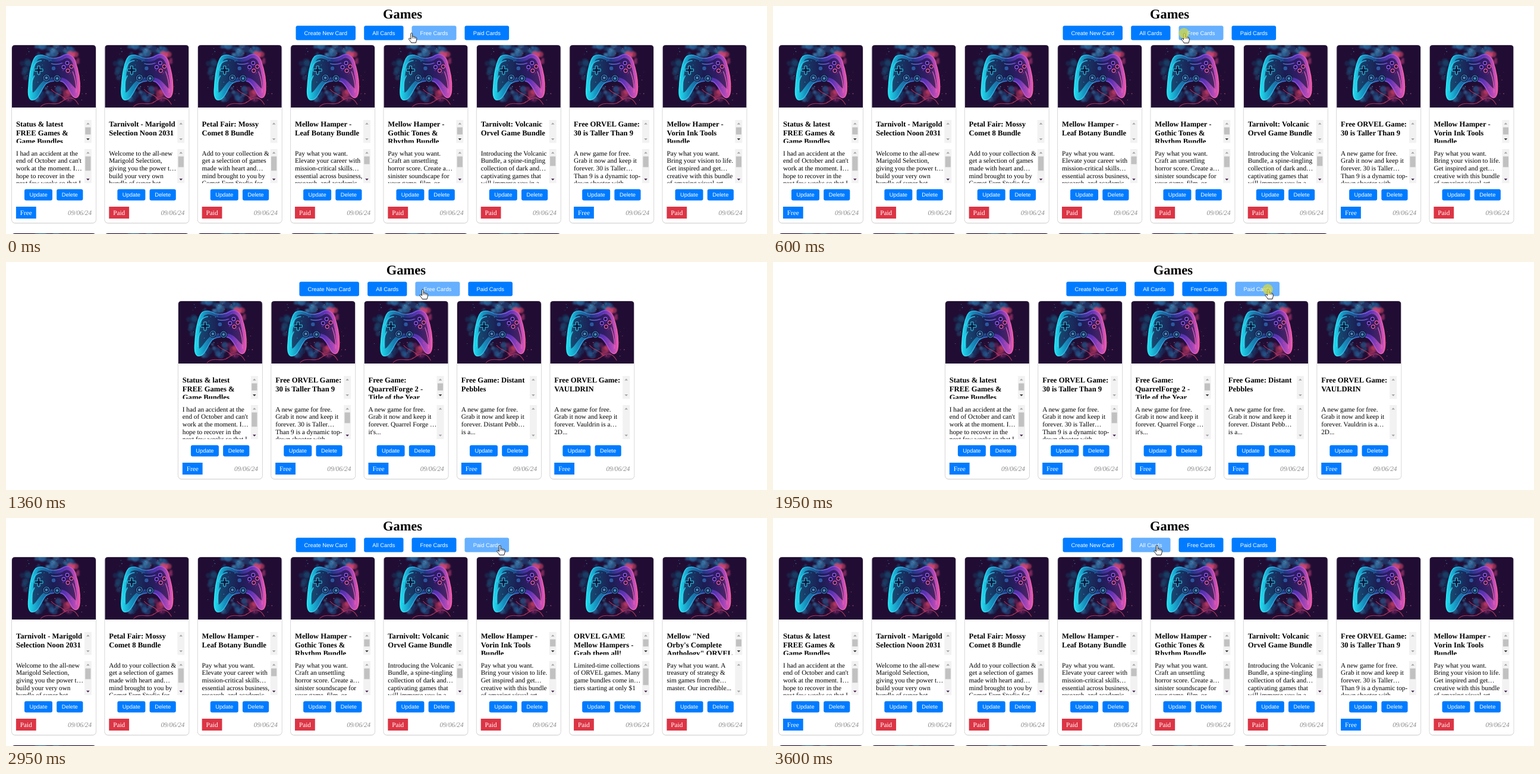
Recreate the animation shown at these times as an HTML page. Size 1280 by 384 pixels, loop 4.68 s.

```html
<!DOCTYPE html>
<html lang="en">
<head>
<meta charset="utf-8">
<title>Games</title>
<style>
html, body { margin: 0; width: 100%; height: 100%; overflow: hidden; background: #fff; }
svg { display: block; width: 100vw; height: 100vh; }
text { font-family: "Liberation Serif", "Times New Roman", serif; font-size: 11.25px; text-rendering: geometricPrecision; }
.h1 { font-size: 22.5px; font-weight: bold; text-anchor: middle; }
.title { font-size: 12.65px; font-weight: bold; }
.btn { font-family: "Liberation Sans", Arial, sans-serif; font-size: 9.37px; fill: #fff; text-anchor: middle; }
.date { font-style: italic; fill: #8a8a8a; text-anchor: end; }
.white { fill: #fff; }
</style>
</head>
<body>
<svg id="stage" viewBox="0 0 1280 384" xmlns="http://www.w3.org/2000/svg"></svg>
<script>
const LOOP = 4680, PITCH = 156.36, ROW = 317;
const BLUE = '#007bff', HOVER = '#66b0ff', RED = '#dc3545';

// [free, title, body, body thumb height]
const CARDS = [
  [1, "Status & latest|FREE Games &|Game Bundles", "I had an accident at the|end of October and can't|work at the moment. I…|hope to recover in the|next few weeks so that I", 24],
  [0, "Tarnivolt - Marigold|Selection Noon 2031", "Welcome to the all-new|Marigold Selection,|giving you the power t…|build your very own|bundle of super hot", 18],
  [0, "Petal Fair: Mossy|Comet 8 Bundle", "Add to your collection &|get a selection of games|made with heart and…|mind brought to you by|Comet Fern Studio for", 24],
  [0, "Mellow Hamper -|Leaf Botany Bundle", "Pay what you want.|Elevate your career with|mission-critical skills…|essential across business,|research, and academic", 13],
  [0, "Mellow Hamper -|Gothic Tones &|Rhythm Bundle", "Pay what you want.|Craft an unsettling|horror score. Create a…|sinister soundscape for|your game, film, or", 18],
  [0, "Tarnivolt: Volcanic|Orvel Game Bundle", "Introducing the Volcanic|Bundle, a spine-tingling|collection of dark and…|captivating games that|will immerse you in a", 16],
  [1, "Free ORVEL Game:|30 is Taller Than 9", "A new game for free.|Grab it now and keep it|forever. 30 is Taller…|Than 9 is a dynamic top-|down shooter with", 18],
  [0, "Mellow Hamper -|Vorin Ink Tools|Bundle", "Pay what you want.|Bring your vision to life.|Get inspired and get…|creative with this bundle|of amazing visual art", 18],
  [0, "ORVEL GAME|Mellow Hampers -|Grab them all!", "Limited-time collections|of ORVEL games. Many|game bundles come in…|tiers starting at only $1", 28],
  [0, 'Mellow "Ned|Orby\'s Complete|Anthology" ORVEL', "Pay what you want. A|treasury of strategy &|sim games from the…|master. Our incredible...", 0],
  [1, "Free Game:|QuarrelForge 2 -|Title of the Year", "A new game for free.|Grab it now and keep it|forever. Quarrel Forge …|it's...", 0],
  [1, "Free Game: Distant|Pebbles", "A new game for free.|Grab it now and keep it|forever. Distant Pebb…|is a...", 0],
  [1, "Free ORVEL Game:|VAULDRIN", "A new game for free.|Grab it now and keep it|forever. Vauldrin is a…|2D...", 0]
];

const NAV = [
  ['Create New Card', 487.5, 100.5],
  ['All Cards', 602.2, 66.3],
  ['Free Cards', 682.5, 75],
  ['Paid Cards', 771.5, 74.6]
];

// [start, end, steps, x, y]: the pointer reaches x,y at the last step
const MOVES = [
  [90, 600, 7, 692, 46],
  [1280, 1530, 4, 837, 50],
  [1700, 1780, 2, 833, 46],
  [2950, 3440, 7, 646, 46]
];
const CLICKS = [[600, 690], [1950, 2040], [3520, 3600]];

const esc = s => s.replace(/&/g, '&amp;');
const rect = (x, y, w, h, fill, r = 0, more = '') =>
  `<rect x="${x}" y="${y}" width="${w}" height="${h}" rx="${r}" fill="${fill}" ${more}/>`;
const text = (x, y, s, cls = '') => `<text x="${x}" y="${y}" class="${cls}">${esc(s)}</text>`;
const circle = (x, y, r, fill, o = 1) => `<circle cx="${x}" cy="${y}" r="${r}" fill="${fill}" opacity="${o}"/>`;
const path = (d, fill, more = '') => `<path d="${d}" fill="${fill}" ${more}/>`;
const lines = (x, y, step, s, cls) =>
  s.split('|').map((l, i) => text(x, y + i * step, l, cls)).join('');

function random(seed) {
  return () => (seed = (seed * 16807) % 2147483647) / 2147483647;
}

function artwork() {
  const rnd = random(77);
  const body = 'M40 19C47 14 55 17 62 21C70 23 80 22 87 17C95 13 103 18 106 26C111 40 115 60 114 76C113 89 107 92 101 84C96 75 92 66 86 62C78 58 66 60 58 64C50 72 46 90 36 92C27 94 27 80 28 70C29 50 33 26 40 19Z';
  let smoke = '', dots = '';
  const puff = (n, x, y, w, h, colors) => {
    for (let i = 0; i < n; i++) {
      smoke += circle(x + (rnd() - .5) * w, y + (rnd() - .5) * h, 2 + rnd() * 5, colors[i % colors.length], .55);
    }
  };
  const blues = ['#1f4f86', '#2a6fa6', '#173463', '#3a86b8'];
  puff(16, 56, 12, 32, 24, blues);
  puff(16, 88, 9, 36, 18, blues);
  puff(14, 62, 84, 40, 24, blues);
  puff(9, 22, 44, 16, 34, ['#14365c', '#1b4a73']);
  puff(9, 103, 22, 18, 20, ['#e2486e', '#b83a78']);
  puff(8, 94, 82, 20, 16, ['#c93c62', '#742a68']);
  for (let i = 0; i < 60; i++) {
    const x = 12 + rnd() * 114;
    dots += circle(x, 4 + rnd() * 94, .25 + rnd() * .6, x < 70 ? '#35b7dc' : '#e4568f', .75);
  }
  const pads = [[58, 55], [76, 56]].map(([x, y]) =>
    circle(x, y, 6.5, '#101033') + `<circle cx="${x}" cy="${y}" r="5" fill="#1c2c5e" stroke="#3e9ad0" stroke-width="1"/>` + circle(x, y, 2, '#58c8e8', .7)).join('');
  const keys = [[93, 30], [100, 36], [87, 37], [94, 43]].map(([x, y], i) =>
    `<circle cx="${x}" cy="${y}" r="2.9" fill="#1a1240" stroke="${i % 2 ? '#ff5b9c' : '#a05cff'}" stroke-width="1.1"/>`).join('');
  return `<g id="art" clip-path="url(#artClip)"><g transform="translate(.5 66)">
    ${rect(0, 0, 141, 105, '#210d33')}
    <g filter="url(#soft)">${smoke}</g>
    ${path('M48 104C58 92 72 104 84 95S104 86 112 100M66 74C74 84 84 82 90 92', 'none', 'stroke="#d13f65" stroke-width="1.1" opacity=".8"')}
    ${path(body, 'url(#neon)', 'stroke="url(#edge)" stroke-width="1.6"')}
    ${path('M44 24C52 20 58 24 64 27C72 29 82 28 88 23C96 19 101 26 103 33C107 48 110 62 109 74C102 70 98 60 88 56C78 52 66 54 56 58C46 64 42 76 35 80C34 62 36 34 44 24Z', '#17123d', 'opacity=".66"')}
    ${path('M34 42C37 31 43 26 50 26M33 77C31 64 35 56 38 51M102 44C106 54 109 67 108 80M66 31C73 33 80 32 85 30', 'none', 'stroke="url(#edge)" stroke-width="1.8" opacity=".85"')}
    ${path('M43 35h4v5h5v4h-5v5h-4v-5h-5v-4h5z', '#11183f', 'stroke="#2fd0ec" stroke-width="1"')}
    ${pads}${keys}${circle(70, 39, 3.2, '#2b58a0')}
    ${dots}</g></g>`;
}

function defs() {
  const stops = list => list.map(([o, c]) => `<stop offset="${o}" stop-color="${c}"/>`).join('');
  return `<defs>
    <clipPath id="artClip"><path d="M.5 171V71Q.5 66 5.5 66H136.5Q141.5 66 141.5 71V171Z"/></clipPath>
    <clipPath id="titleClip"><rect x="7" y="192" width="127" height="38.5"/></clipPath>
    <clipPath id="bodyClip"><rect x="7" y="241" width="127" height="57.3"/></clipPath>
    <filter id="soft"><feGaussianBlur stdDeviation=".9"/></filter>
    <linearGradient id="neon">${stops([[0, '#22dcf0'], [.2, '#1690bd'], [.48, '#24357c'], [.72, '#5d34b4'], [1, '#e356b8']])}</linearGradient>
    <linearGradient id="edge" gradientUnits="userSpaceOnUse" x1="27" y1="0" x2="114" y2="0">${stops([[0, '#2cecf8'], [.4, '#2b86d0'], [.7, '#8a4bea'], [1, '#ff62a0']])}</linearGradient>
    ${artwork()}</defs>`;
}

function scrollbar(y, h, thumb, dark) {
  const down = y + h - 6.2;
  return rect(122.4, y, 12, h, '#f2f2f2') +
    path(`M125.6 ${y + 7.6}l2.8-3 2.8 3z`, '#a3a3a3') +
    path(`M125.6 ${down - 1.4}h5.6l-2.8 3z`, thumb ? dark : '#a3a3a3') +
    (thumb ? rect(123.8, y + 12.4, 9.2, thumb, '#c1c1c1') : '');
}

function button(x, y, w, h, label) {
  return rect(x, y, w, h, BLUE, 3) + text(x + w / 2, y + h / 2 + 3.3, label, 'btn');
}

function shell() {
  return rect(0, 66.4, 142, 300, '#000', 6, 'opacity=".1"') +
    rect(0, 65.6, 142, 299.9, '#fff', 5.6, 'stroke="#cfcfcf" stroke-width=".8"') +
    '<use href="#art"/>';
}

function card([free, title, body, thumb]) {
  return shell() +
    `<g clip-path="url(#titleClip)">${lines(7.4, 203.1, 14.6, title, 'title')}</g>` +
    `<g clip-path="url(#bodyClip)">${lines(7.4, 251.7, 12.62, body)}</g>` +
    scrollbar(192, 38.5, title.split('|').length > 2 ? 12 : 0, '#333') +
    scrollbar(241, 57.3, thumb, '#43204c') +
    button(21.5, 308.5, 47, 19, 'Update') + button(75.7, 308.5, 44.2, 19, 'Delete') +
    rect(7.4, 338, 33.8, 20, free ? BLUE : RED) +
    text(14.3, 351.8, free ? 'Free' : 'Paid', 'white') +
    text(134.6, 351.8, '09/06/24', 'date');
}

function view(cards, x, below, shift) {
  const at = (i, y, s) => `<g transform="translate(${x + i * PITCH} ${y})">${s}</g>`;
  let s = text(667 + shift, 21, 'Games', 'h1');
  cards.forEach((c, i) => s += at(i, 0, card(c)));
  for (let i = 0; i < below; i++) s += at(i, ROW, shell());
  NAV.forEach(([label, bx, w]) => s += `<g class="nav">${button(bx + shift, 33.2, w, 24.4, label)}</g>`);
  return `<g class="view">${s}</g>`;
}

const HAND = 'M-1.5 1.2C-1.5-.5 1.2-.5 1.2 1.2V6C2 5.2 3.6 5.4 3.8 6.6C4.8 5.9 6 6.3 6.2 7.3C7.2 6.9 8.3 7.4 8.3 8.6V11.5C8.3 13.5 7 14.3 7 16.3H-.8C-1.2 14.6-3.6 12.5-4.8 10.3C-5.3 9-3.8 8-2.8 9L-1.5 10.5Z';

const stage = document.getElementById('stage');
stage.innerHTML = defs() +
  view(CARDS.slice(0, 8), 9.5, 6, 0) +
  view(CARDS.filter(c => c[0]), 289.4, 0, 5.9) +
  view(CARDS.filter(c => !c[0]).slice(0, 8), 9.5, 1, 0) +
  `<g id="hand">${path(HAND, '#fff', 'stroke="#111" stroke-width=".95" stroke-linejoin="round"')}
   ${path('M1.2 6V9M3.8 6.8V9.3M6.2 7.5V9.7', 'none', 'stroke="#111" stroke-width=".8"')}</g>` +
  `<g id="click">${circle(-.8, -.2, 8.7, '#dcdc30', .68)}</g>`;

const views = [...stage.querySelectorAll('.view')];
const navs = views.map(v => [...v.querySelectorAll('.nav rect')]);
const hand = document.getElementById('hand'), click = document.getElementById('click');

const ease = p => p < .5 ? 4 * p ** 3 : 1 - (2 - 2 * p) ** 3 / 2;

function pointer(t) {
  let x = 682.4, y = 45.6;
  for (const [start, end, steps, tx, ty] of MOVES) {
    if (t < start) break;
    const gap = (end - start) / (steps - 1);
    const k = Math.min(steps, Math.floor((t - start) / gap + 1e-6) + 1);
    const p = ease(k / steps);
    x += (tx - x) * p;
    y += (ty - y) * p;
  }
  return [x, y];
}

function draw(t) {
  const v = t < 690 || t >= 3600 ? 0 : t < 2040 ? 1 : 2;
  const [x, y] = pointer(t);
  const shift = v === 1 ? 5.9 : 0;
  views.forEach((g, i) => g.style.display = i === v ? '' : 'none');
  navs[v].forEach((r, i) => {
    const left = NAV[i][1] + shift;
    r.setAttribute('fill', x > left - 1 && x < left + NAV[i][2] ? HOVER : BLUE);
  });
  const place = `translate(${x} ${y})`;
  hand.setAttribute('transform', place);
  click.setAttribute('transform', place);
  click.style.display = CLICKS.some(([a, b]) => t >= a && t < b) ? '' : 'none';
}

const begin = performance.now();
function tick() {
  draw((performance.now() - begin) % LOOP);
  requestAnimationFrame(tick);
}
tick();
</script>
</body>
</html>
```
